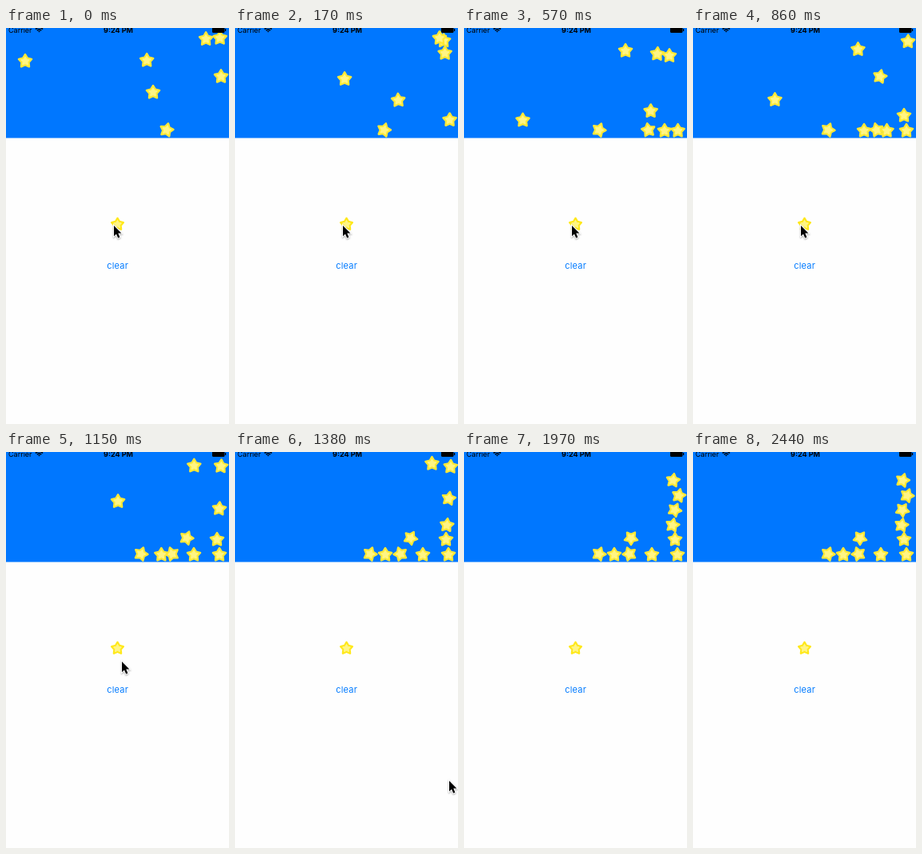
An HTML page with a canvas for the animation above (2.8 s loop, 279 px wide and 495 px high).

```html
<!DOCTYPE html>
<html lang="en">
<head>
<meta charset="utf-8">
<title>Falling stars</title>
<style>
  html, body { margin: 0; width: 100%; height: 100%; overflow: hidden; background: #fefefe; }
  canvas { display: block; }
</style>
</head>
<body>
<canvas id="stage" width="279" height="495"></canvas>
<script>
const ctx = document.getElementById('stage').getContext('2d');
const LOOP = 2.8, STEP = .0575;
const FLOOR = 137.5, INK = '#000';
const FONT = 'Inter, Roboto, sans-serif';

// Every star is thrown at the floor, arcs up to the right wall, then falls and drifts to rest.
const START = { x: 24, y: 41 }, BOUNCE = { x: 62, y: 126 }, WALL = { x: 270, y: 10 };
const DIVE = .01, FLIGHT = .45, DRIFT = 1.2;
const ARC = 90, FALL = 330;

// A stop is [x, y, seconds to get there]; several stops mean it was knocked on the way.
const thrown = (at, lean, ...stops) => ({ at, lean, stops, hit: at + DIVE + FLIGHT, from: WALL });

const stars = [
  thrown(-1.28, 20, [169, 127]),
  { at: 0, hit: 0, lean: -20, from: { x: 184, y: 80 }, stops: [[231, 127, .4], [230, 127, .46], [207, 127, .3]] },
  thrown(-.85, 0, [267, 128]),
  thrown(-.54, 0, [235, 128]),
  thrown(-.417, 0, [188, 128]),
  thrown(-.257, 0, [237, 18, .15], [264, 109, .3]),
  thrown(0, 36, [242, 32, .11], [209, 107]),
  thrown(.262, 12, [261, 91]),
  thrown(.54, 32, [262, 72]),
  thrown(.765, 20, [268, 54]),
  thrown(.971, 20, [261, 33, .17], [263, 35]),
];

const lerp = (a, b, u) => a + (b - a) * u;
const between = (p, q, u) => ({ x: lerp(p.x, q.x, u), y: lerp(p.y, q.y, u) });

function place(star, t) {
  const age = t - star.at;
  if (t < star.hit) {
    if (age < DIVE) return between(START, BOUNCE, age / DIVE);
    const u = (age - DIVE) / FLIGHT, p = between(BOUNCE, WALL, u);
    return { x: p.x, y: p.y - ARC * u * (1 - u) };
  }
  let s = t - star.hit, { x, y } = star.from;
  for (const [toX, toY, time = DRIFT] of star.stops) {
    if (s < time) return { x: lerp(x, toX, s / time), y: Math.min(toY, y + FALL * s * s) };
    s -= time;
    [x, y] = [toX, toY];
  }
  return { x, y };
}

function starPath(radius) {
  ctx.beginPath();
  for (let i = 0; i < 10; i++) {
    const r = i % 2 ? radius * .55 : radius, a = i * Math.PI / 5 - Math.PI / 2;
    ctx.lineTo(r * Math.cos(a), r * Math.sin(a));
  }
  ctx.closePath();
}

function drawStar({ x, y }, degrees, radius, edge) {
  ctx.save();
  ctx.translate(x, y + .5);
  ctx.rotate(degrees * Math.PI / 180);
  ctx.lineJoin = 'round';
  for (const [size, width, color] of [[1, 2.6, edge], [.68, 1, '#fff584']]) {
    ctx.lineWidth = width;
    ctx.strokeStyle = ctx.fillStyle = color;
    starPath(radius * size);
    ctx.fill();
    ctx.stroke();
  }
  ctx.restore();
}

function text(label, x, y, font, color, align = 'center') {
  ctx.font = `${font} ${FONT}`;
  ctx.fillStyle = color;
  ctx.textAlign = align;
  ctx.fillText(label, x, y);
}

function drawStatusBar() {
  text('Carrier', 3, 6, '9px', INK, 'left');
  text('9:24 PM', 140.5, 6, 'bold 9px', INK);
  ctx.strokeStyle = ctx.fillStyle = INK;
  ctx.lineWidth = 1.6;
  for (const r of [1, 3.5, 6]) {
    ctx.beginPath();
    ctx.arc(41.5, 5.5, r, -Math.PI * .77, -Math.PI * .23);
    ctx.stroke();
  }
  ctx.beginPath();
  ctx.roundRect(258, -1, 15.5, 7, 1.5);
  ctx.fill();
  ctx.fillRect(274, 1, 1.2, 3);
}

const arrow = new Path2D('M0 0V13.2L3 10.4L5.2 15.4L7.4 14.4L5.3 9.5H9.4Z');

// The pointer rests on the button, then leaves at the lower right.
function drawCursor(t) {
  if (t > 1.4) return;
  const u = (t - 1.15) / .23;
  const tip = t < 1.1 ? { x: 135, y: 247 }
    : between({ x: 145, y: 262 }, { x: 268, y: 411 }, Math.max(0, u));
  ctx.save();
  ctx.translate(tip.x, tip.y);
  ctx.shadowColor = 'rgba(0,0,0,.35)';
  ctx.shadowBlur = 2;
  ctx.shadowOffsetY = 1;
  ctx.strokeStyle = '#fff';
  ctx.lineWidth = 2;
  ctx.stroke(arrow);
  ctx.shadowColor = 'transparent';
  ctx.fillStyle = INK;
  ctx.fill(arrow);
  ctx.restore();
}

function draw(t) {
  ctx.fillStyle = '#fefefe';
  ctx.fillRect(0, 0, 279, 495);
  ctx.fillStyle = '#0077ff';
  ctx.fillRect(0, 0, 279, FLOOR);
  for (const star of stars) {
    if (t < star.at) continue;
    const turn = Math.min(1, Math.max(0, t - star.hit) / DRIFT);
    drawStar(place(star, t), star.lean * turn, 8.4, '#ffe936');
  }
  drawStatusBar();
  drawStar({ x: 139.5, y: 245 }, 0, 7.6, '#ffe81a');
  ctx.letterSpacing = '.2px';
  text('clear', 139.6, 301, '11px', '#007aff');
  ctx.letterSpacing = '0px';
  drawCursor(t);
}

function tick() {
  const t = performance.now() / 1000 % LOOP;
  draw(Math.floor((t + .006) / STEP) * STEP);
  requestAnimationFrame(tick);
}
tick();
</script>
</body>
</html>
```
